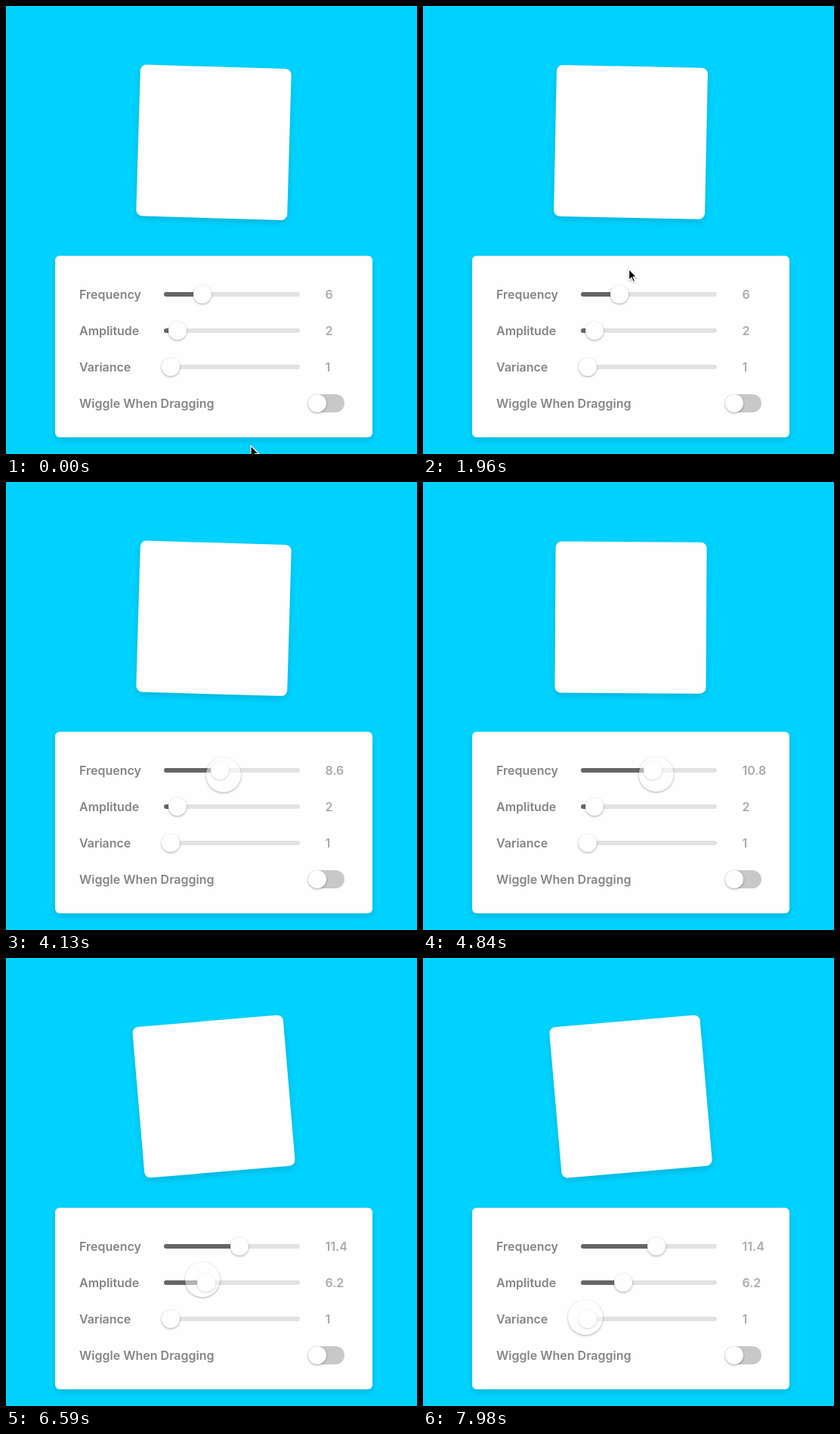
Recreate the animation shown at these times as an HTML page. Size 544 by 592 pixels, loop 8000 ms.

```html
<!DOCTYPE html>
<html lang="en">
<head>
<meta charset="utf-8">
<title>Wiggle controls</title>
<style>
  html, body { margin: 0; width: 100%; height: 100%; overflow: hidden; background: #00d2ff; }
  body { position: relative; font: 600 16px/20px Inter, sans-serif; color: #858585; }
  div, svg { position: absolute; box-sizing: border-box; }
  #square, #panel { background: #fefefe; border-radius: 6px; box-shadow: 0 4px 8px rgba(0, 0, 0, .14); }
  #square { left: 175px; top: 80px; width: 200px; height: 200px; border-radius: 8px; }
  #panel { left: 65px; top: 330px; width: 420px; height: 240px; }
  .row { left: 0; width: 100%; height: 24px; }
  .label { left: 32px; top: 2px; white-space: nowrap; }
  .value { left: 357.5px; top: 2px; color: #aaa; }
  .track, .fill { left: 144px; top: 9px; height: 6px; border-radius: 3px; }
  .track { width: 180px; background: #e2e2e2; }
  .fill { background: #666; }
  .knob { top: 0; width: 24px; height: 24px; margin-left: -12px; border-radius: 50%; background: #fefefe; }
  .knob, #touch { box-shadow: 0 1px 3px rgba(0, 0, 0, .35); }
  .toggle { left: 335px; top: 0; width: 48px; height: 24px; border-radius: 12px; background: #c8c8c8; }
  #cursor { left: 0; top: 0; }
  #arrow { left: -2px; top: -2px; filter: drop-shadow(0 1px 1px rgba(0, 0, 0, .3)); }
  #touch { left: -23px; top: -23px; width: 46px; height: 46px; border-radius: 50%; background: rgba(255, 255, 255, .5); }
</style>
</head>
<body>
<div id="square"></div>
<div id="panel"></div>
<div id="cursor">
  <svg id="arrow" width="16" height="22" viewBox="-2 -2 16 22">
    <path d="M0 0V14.5L3.4 11.4L5.7 16.8L8 15.8L5.7 10.5H10.3Z" stroke="#fff" stroke-width="1.2"/>
  </svg>
  <div id="touch"></div>
</div>
<script>
// All times are in seconds.
const DURATION = 8;
const TOUCH_START = 3;
const TRACK_LEFT = 144, TRACK_WIDTH = 180;
const START_PHASE = .335;

const frequencyDrag = { start: 3.32, end: 5.02, from: 6, to: 11.36 };
const amplitudeDrag = { start: 5.95, end: 6.5, from: 2, to: 6.2 };

// The pointer rests between moves.
const pointerStart = { x: 324, y: 581 };
const pointerMoves = [
  { start: 1.22, end: 2.3, x: 249, y: 241 },
  { start: 2.8, end: 3.3, x: 264, y: 388 },
  { ...frequencyDrag, x: 314, y: 386 },
  { start: 5.05, end: 5.5, x: 244, y: 425 },
  { start: 5.6, end: 5.9, x: 222, y: 425 },
  { ...amplitudeDrag, x: 260, y: 425 },
  { start: 6.8, end: 7.4, x: 215, y: 475 }
];

const [square, panel, cursor, arrow, touch] =
  ['square', 'panel', 'cursor', 'arrow', 'touch'].map(id => document.getElementById(id));

const progress = ({ start, end }, t) => Math.min(1, Math.max(0, (t - start) / (end - start)));
const mix = (a, b, p) => a + (b - a) * p;
const draggedValue = (drag, t) => mix(drag.from, drag.to, progress(drag, t));

function pointerAt(t) {
  return pointerMoves.reduce((point, move) => {
    const p = progress(move, t);
    return { x: mix(point.x, move.x, p), y: mix(point.y, move.y, p) };
  }, pointerStart);
}

// Completed wiggle cycles: the integral of the frequency over time
function phaseAt(t) {
  const { start, end, from, to } = frequencyDrag;
  const p = progress(frequencyDrag, t);
  const gained = (end - start) * p * p / 2 + Math.max(0, t - end);
  return START_PHASE + from * t + (to - from) * gained;
}

function addRow(label, index, controls) {
  const row = document.createElement('div');
  row.className = 'row';
  row.style.top = 39 + 48 * index + 'px';
  row.innerHTML = `<div class="label">${label}</div>${controls}`;
  panel.append(row);
  return row;
}

function addSlider(label, index, min, max) {
  const parts = ['track', 'fill', 'knob', 'value'];
  const row = addRow(label, index, parts.map(part => `<div class="${part}"></div>`).join(''));
  const [, fill, knob, value] = parts.map(part => row.querySelector('.' + part));
  return v => {
    const width = (v - min) / (max - min) * TRACK_WIDTH;
    fill.style.width = width + 'px';
    knob.style.left = TRACK_LEFT + width + 'px';
    value.textContent = Math.round(v * 10) / 10;
  };
}

const setFrequency = addSlider('Frequency', 0, .5, 20);
const setAmplitude = addSlider('Amplitude', 1, 0, 20);
const setVariance = addSlider('Variance', 2, 0, 20);
addRow('Wiggle When Dragging', 3, '<div class="toggle"></div><div class="knob" style="left:347px"></div>');
setVariance(1);

function draw(t) {
  const amplitude = draggedValue(amplitudeDrag, t);
  setFrequency(draggedValue(frequencyDrag, t));
  setAmplitude(amplitude);

  const angle = amplitude * Math.sin(2 * Math.PI * phaseAt(t));
  const drop = .85 * Math.abs(angle) - 1.2;
  square.style.transform = `translateY(${drop}px) rotate(${angle}deg)`;

  const { x, y } = pointerAt(t);
  cursor.style.transform = `translate(${x}px, ${y}px)`;
  arrow.style.display = t < TOUCH_START ? 'block' : 'none';
  touch.style.display = t < TOUCH_START ? 'none' : 'block';
}

const startTime = performance.now();
function tick() {
  draw((performance.now() - startTime) / 1000 % DURATION);
  requestAnimationFrame(tick);
}
tick();
</script>
</body>
</html>
```
